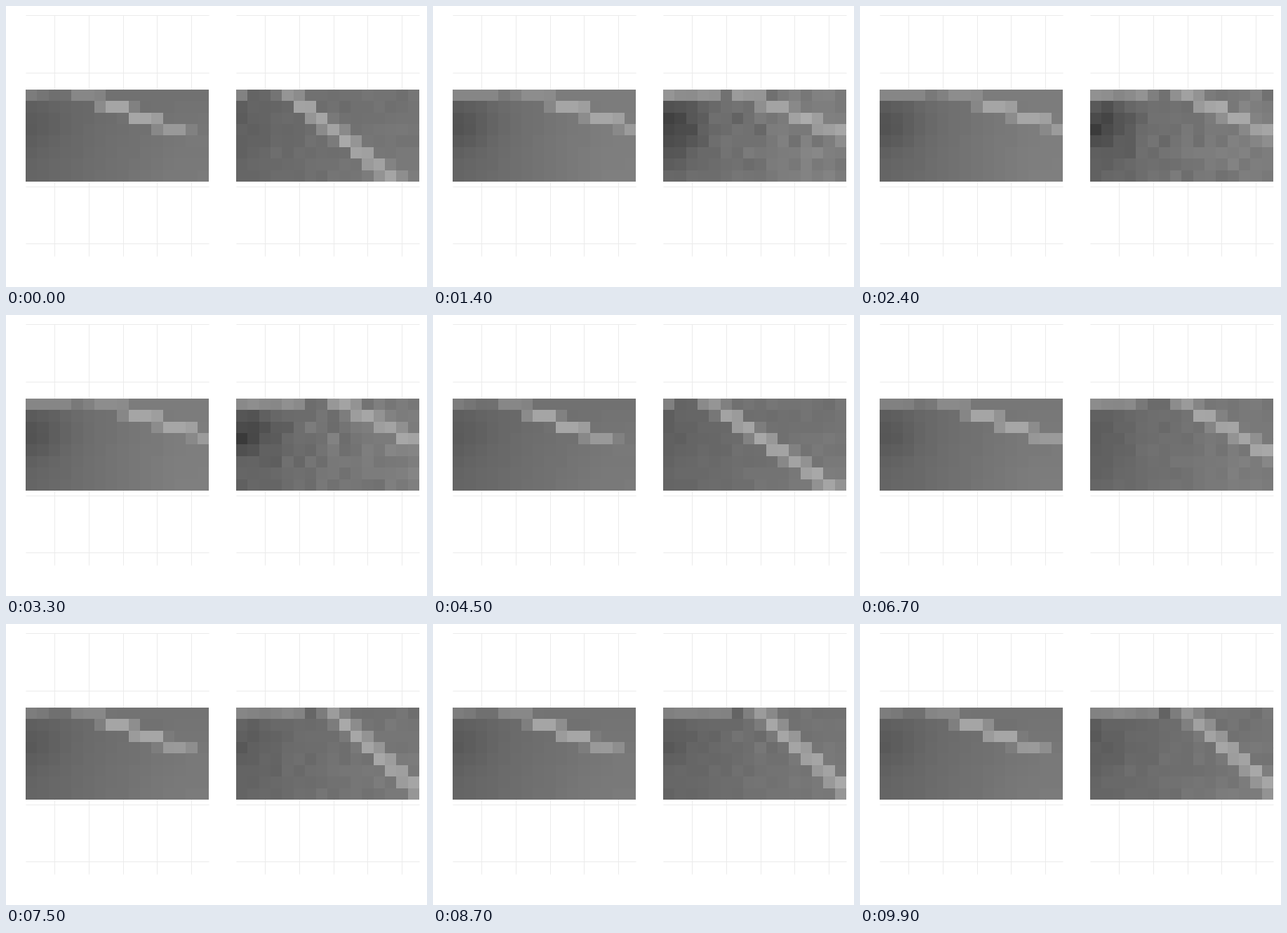
Animation, 600 px wide and 400 px high, one loop 10000 ms. Source, as a matplotlib script:

```python
import numpy as np
import matplotlib.pyplot as plt
from matplotlib.animation import FuncAnimation

W, H, DPI = 600, 400, 100
COLS, ROWS, FRAMES = 16, 8, 100
col, row = np.meshgrid(np.arange(COLS), np.arange(ROWS))
waves = np.random.default_rng(4).normal(size=(2, ROWS, COLS))

# time, lightness 0..1, streak start, streak slope, hollow depth, rim length
POSES = np.array([
    (0, 0.0, 3.75, 1.25, 6, 1),
    (14, 1.0, 6.1, 2.4, 36, 5),
    (33, 1.0, 8.3, 1.9, 34, 6),
    (45, 0.0, 3.3, 1.45, 6, 1),
    (60, 0.9, 7.0, 2.2, 8, 3),
    (75, 0.1, 7.6, 1.1, 9, 6),
    (99, 0.1, 7.6, 1.13, 9, 6),
])


def cover(a, b):
    """Share of each cell that lies between columns a and b."""
    return np.clip(np.minimum(col + 1, b) - np.maximum(col, a), 0, 1)


def scene(light, start, slope, hollow, rim, glow, shade, peak, strength):
    x, y = col / (COLS - 1), row / (ROWS - 1)
    sky = 114 + 10 * light
    g = 101 + (sky - 101) * np.minimum(1, 1.2 * x) + (9 - 6 * light) * x * y
    g -= hollow * np.exp(-(col / 3) ** 2 - ((row - 2.6) / 2.1) ** 2)

    # top row: bright rim, then shade up to the streak
    top = sky - shade * cover(rim, start) + glow * cover(0, rim)
    g = np.where(row == 0, top, g)

    left = start + slope * row
    streak = cover(left, left + 1 + 0.75 * slope) * strength
    return g + (peak - g) * streak


def smooth_view(light):
    fade = np.exp(-((row - 1.7) / 1.75) ** 4)
    return scene(light, 3.95 + 1.65 * light, 2.5 + 0.5 * light,
                 10 + 8 * light, 1.5 + 2.5 * light,
                 glow=10, shade=3, peak=166, strength=fade)


def rough_view(t, light, start, slope, hollow, rim):
    strength = np.where(row == 0, 0.75, 1)
    g = scene(light, start, slope, hollow, rim,
              glow=17, shade=14, peak=165, strength=strength)
    grain = waves[0] * np.cos(t / 8) + waves[1] * np.sin(t / 8)
    return g + (1.5 + hollow / 12) * grain


fig = plt.figure(figsize=(W / DPI, H / DPI), dpi=DPI, facecolor="white")
ax = fig.add_axes([0, 0, 1, 1])
ax.set_axis_off()


def panel(x0):
    grid = dict(color="#ebebeb", lw=0.72, zorder=1)
    ax.vlines(x0 + 41 + 48.8 * np.arange(5), 13, 356, **grid)
    ax.hlines(13.4 + 81.25 * np.arange(5), x0, x0 + 261, **grid)
    return ax.imshow(np.zeros((ROWS, COLS)), cmap="gray", vmin=0, vmax=255,
                     extent=(x0 + 0.4, x0 + 260.6, 249.55, 119.4),
                     interpolation="nearest", aspect="auto", zorder=2)


smooth, rough = panel(28), panel(328)
ax.set_xlim(0, W)
ax.set_ylim(H, 0)


def draw(i):
    pose = [np.interp(i, POSES[:, 0], p) for p in POSES[:, 1:].T]
    smooth.set_data(smooth_view(pose[0]))
    rough.set_data(rough_view(i, *pose))
    return smooth, rough


anim = FuncAnimation(fig, draw, frames=FRAMES, interval=100,
                     repeat=True, repeat_delay=0, blit=False)
plt.show()
```
